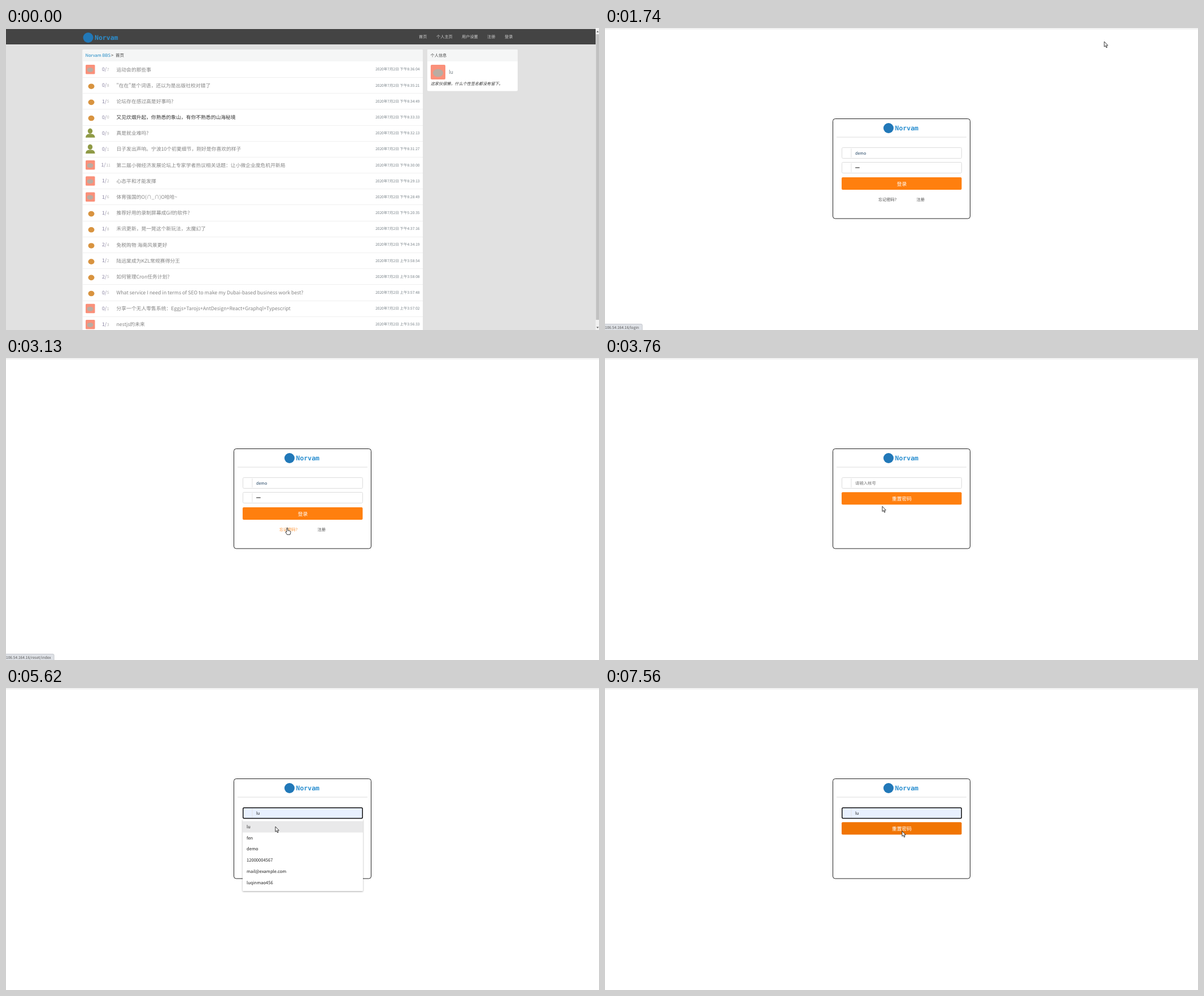
Recreate the animation shown at these times as an HTML page with a canvas. Size 1050 by 534 pixels, loop 8000 ms.

```html
<!DOCTYPE html>
<html lang="zh">
<head>
<meta charset="utf-8">
<title>Norvam BBS</title>
<style>
  html, body { margin: 0; width: 100%; height: 100%; overflow: hidden; background: #fff; }
  canvas { display: block; }
</style>
</head>
<body>
<canvas id="stage" width="1050" height="534"></canvas>
<script>
const ctx = document.getElementById('stage').getContext('2d');
ctx.textRendering = 'geometricPrecision';
const SANS = '"Noto Sans CJK SC", "Noto Sans CJK", "Noto Sans", sans-serif';
const MONO = '"DejaVu Sans Mono", monospace';
const LOOP = 8000;
const BLUE = '#2b8fd0';

// avatar | replies | views | title | time
const topics = `e|0|7|运动会的那些事|下午8:36:04
t|0|8|"在在"是个词语，还以为是出版社校对错了|下午8:35:21
t|1|5|论坛存在感过高是好事吗?|下午8:34:49
t|0|0|又见炊烟升起，你熟悉的象山，有你不熟悉的山海秘境|下午8:33:33
p|0|9|真是就业难吗?|下午8:32:13
p|0|1|日子发出声响。宁波10个初夏细节，刚好是你喜欢的样子|下午8:31:27
e|1|11|第二届小微经济发展论坛上专家学者热议相关话题：让小微企业度危机开新局|下午8:30:00
e|1|2|心态平和才能发揮|下午8:29:13
e|1|6|体育强国的O(∩_∩)O哈哈~|下午8:28:49
t|1|4|推荐好用的录制屏幕成Gif的软件?|下午5:20:35
t|1|8|禾讯更新，晃一晃这个新玩法，太魔幻了|下午4:37:16
t|2|4|免税购物 海南风景更好|下午4:34:19
t|1|2|陆远棠成为KZL常规赛得分王|上午3:58:54
t|2|5|如何管理Cron任务计划?|上午3:58:08
t|0|5|What service I need in terms of SEO to make my Dubai-based business work best?|上午3:57:48
e|0|1|分享一个无人零售系统：Eggjs+Tarojs+AntDesign+React+Graphql+Typescript|上午3:57:02
e|1|3|nestjs的未来|上午3:56:33`.split('\n').map(line => line.split('|'));
const UNREAD = 3;

const accounts = ['lu', 'fen', 'demo', '12000004567', 'mail@example.com', 'luqinmao456'];

// Cursor moves: first step, last step, number of steps, end point
const moves = [
  [190, 730, 8, 884, 7],
  [880, 1030, 3, 885, 14],
  [1740, 1740, 1, 884, 24],
  [1817, 2510, 10, 620, 222],
  [2580, 3130, 8, 498, 300],
  [3210, 3210, 1, 499, 301],
  [3690, 3920, 4, 483, 223.5],
  [5230, 5300, 2, 480, 221],
  [5470, 5620, 3, 477, 245],
  [6170, 6320, 3, 502.5, 257],
  [6400, 6400, 1, 511, 258],
  [6550, 6720, 3, 522, 254],
  [7100, 7330, 4, 526, 253]
];
const clicks = [[1510, 1580], [3530, 3607], [3920, 3995], [5940, 6020]];

const between = (v, a, b) => v >= a && v < b;
const inside = (p, x0, y0, x1, y1) => between(p.x, x0, x1) && between(p.y, y0, y1);

function cursorAt(t) {
  let x = 1014, y = 542;
  for (const [start, end, steps, toX, toY] of moves) {
    if (t < start) break;
    const ratio = end > start ? Math.min(1, (t - start) / (end - start)) : 1;
    const u = (Math.floor(ratio * (steps - 1) + 0.1) + 1) / steps;
    x += (toX - x) * u;
    y += (toY - y) * u;
  }
  return { x, y };
}

function rect(x, y, w, h, fill) {
  ctx.fillStyle = fill;
  ctx.fillRect(x, y, w, h);
}

function box(x, y, w, h, r, fill, stroke, width = 1) {
  ctx.beginPath();
  ctx.roundRect(x, y, w, h, r);
  if (fill) { ctx.fillStyle = fill; ctx.fill(); }
  if (stroke) { ctx.strokeStyle = stroke; ctx.lineWidth = width; ctx.stroke(); }
}

function oval(x, y, rx, ry, fill) {
  ctx.fillStyle = fill;
  ctx.beginPath();
  ctx.ellipse(x, y, rx, ry, 0, 0, 7);
  ctx.fill();
}

// Text centred vertically on cy; returns its width
function text(str, x, cy, size, color, align = 'left', style = '', family = SANS) {
  ctx.font = `${style} ${size}px ${family}`;
  ctx.fillStyle = color;
  ctx.textAlign = align;
  ctx.fillText(str, x, cy + size * 0.37);
  return ctx.measureText(str).width;
}

function shape(path, x, y) {
  const p = new Path2D(path);
  ctx.save();
  ctx.translate(x, y);
  ctx.fillStyle = '#fff';
  ctx.strokeStyle = '#222';
  ctx.lineWidth = 0.9;
  ctx.lineJoin = 'round';
  ctx.fill(p);
  ctx.stroke(p);
  ctx.restore();
}

function drawLogo(x, y) {
  oval(x, y, 9, 9, '#2178b8');
  text('Norvam', x + 11.5, y, 11.5, BLUE, 'left', 'bold', MONO);
}

function drawAvatar(kind, cy) {
  if (kind === 'e') {
    box(141, cy - 8, 16.5, 16.5, 1.5, '#fa907a');
    oval(149, cy + 1, 5.5, 4, '#b9aca2');
  } else if (kind === 't') {
    oval(151, cy + 2, 5.5, 4.8, '#d8933f');
  } else {
    oval(149, cy - 3.5, 4.2, 4.7, '#8f9a45');
    box(141, cy + 1.5, 16.5, 6.5, [6, 6, 0, 0], '#8f9a45');
  }
}

function drawTopic([avatar, replies, views, title, time], i) {
  const cy = 73 + 28.18 * i;
  drawAvatar(avatar, cy);
  const x = 170 - (views.length - 1) * 1.5;
  const w = text(replies + '/', x, cy, 8.6, '#857f9e');
  text(views, x + w + 0.6, cy + 0.3, 7, '#b4b4b4');
  text(title, 195.5, cy + 0.3, 8.8, i === UNREAD ? '#333' : '#858585');
  text('2020年7月2日 ' + time, 732.5, cy, 6.6, '#778087', 'right');
  rect(136, Math.round(cy + 14), 602, 1, '#f0f0f0');
}

function drawForum(pointer) {
  rect(0, 0, 1050, 534, '#e1e1e1');
  rect(0, 0, 1050, 2, '#f5f5f5');
  rect(0, 1.5, 1044, 27.5, '#444');
  drawLogo(145.5, 17);
  const hover = inside(pointer, 881, 9, 899, 22);
  [['首页', 731], ['个人主页', 762], ['用户设置', 807], ['注册', 852], ['登录', 883]].forEach(([label, x]) =>
    text(label, x, 15.5, 7.2, hover && x === 883 ? '#fff' : '#d0d0d0'));

  box(135.5, 38, 602.5, 500, 2, '#fff');
  box(135.5, 38, 602.5, 21, [2, 2, 0, 0], '#f5f6f6');
  text('Norvam BBS', 140.5, 48.5, 7.6, '#1a87c4');
  text('>', 186, 48.5, 7.6, '#444');
  text('首页', 194, 48.5, 7.6, '#444');
  topics.forEach(drawTopic);

  box(746, 38, 160, 73.5, 2, '#fff');
  box(746, 38, 160, 21, [2, 2, 0, 0], '#f5f6f6');
  text('个人信息', 751.5, 48.5, 7.2, '#444');
  box(752, 65, 26, 26, 2, '#fa907a');
  oval(765, 79.5, 9, 7, '#b9aca2');
  text('lu', 784, 78, 9, '#778087');
  text('这家伙很懒，什么个性签名都没有留下。', 752, 98.5, 7.1, '#333', 'left', 'italic');

  rect(1044, 1, 6, 533, '#f1f1f1');
  rect(1044.5, 11, 5.5, 505, '#c1c1c1');
  ctx.fillStyle = '#555';
  ctx.fill(new Path2D('M1045.5 7.5h4l-2-2.5zM1045.5 528.5h4l-2 2.5z'));
  return hover ? 'hand' : 'arrow';
}

function drawCard() {
  rect(0, 0, 1050, 534, '#fff');
  rect(0, 1, 1050, 1, '#dfdfdf');
  box(403.5, 160.5, 243, 176.5, 4, '#fff', '#222');
  drawLogo(502, 177);
  rect(410, 192.5, 230, 1, '#ddd');
}

function drawField(y, fill = '#fff', focused = false) {
  if (focused) box(419.75, y + 0.75, 211.5, 18.75, 2, fill, '#101010', 1.5);
  else box(419.5, y + 0.5, 212, 19, 2, fill, '#dcdcdc');
  rect(435.5, y + 2, 1, 16, '#e2e2e2');
}

function drawButton(label, y, pointer) {
  const hover = inside(pointer, 419, y, 632, y + 22);
  box(419, y, 212.5, 22, 2, hover ? '#f17503' : '#ff7f0e');
  text(label, 525.5, y + 11.7, 8.8, '#fff', 'center');
}

function drawLogin(pointer) {
  drawCard();
  drawField(211);
  text('demo', 443, 221, 7.1, '#1e4060', 'left', '500');
  drawField(237);
  [444.5, 447, 449.5].forEach(x => oval(x, 247, 0.9, 0.9, '#222'));
  drawButton('登录', 264, pointer);
  const forgot = inside(pointer, 483, 297, 518, 310);
  text('忘记密码?', 484, 303, 7.2, forgot ? '#ff8c26' : '#444');
  text('注册', 551.5, 303, 7.2, '#444');
  const overField = inside(pointer, 419, 211, 632, 231) || inside(pointer, 419, 237, 632, 257);
  return forgot ? 'hand' : overField ? 'beam' : 'arrow';
}

function drawAccounts(picked) {
  ctx.save();
  ctx.shadowColor = 'rgba(0,0,0,.35)';
  ctx.shadowBlur = 3;
  ctx.shadowOffsetY = 1;
  box(419, 232, 213, 127, 1, '#fff');
  ctx.restore();
  if (picked) rect(419, 235.5, 213, 20, '#e9e9ea');
  accounts.forEach((name, i) => text(name, 426, 245 + 19.8 * i, 7.6, '#222'));
}

function drawReset(t, pointer) {
  const focused = t >= 3995;
  const listOpen = between(t, 4070, 6020);
  const filled = t >= 5545;
  const caret = between(t, 3995, 4520) || between(t, 5000, 5470) ||
    between(t, 6020, 6550) || between(t, 7100, 7560);

  drawCard();
  drawField(211, filled ? '#e8f0fe' : '#fff', focused);
  if (filled) text('lu', 443, 221, 7.3, '#222');
  else text('请输入帐号', 443, 221, 7.4, '#757575');
  if (caret) rect(t < 6000 ? 443 : 450.5, 217, 0.9, 8, '#111');
  if (listOpen) drawAccounts(filled);
  else drawButton('重置密码', 237.3, pointer);
  return inside(pointer, 419, 211, 632, 231) ? 'beam' : 'arrow';
}

function drawStatus(url, width) {
  box(-2, 523.5, width + 2, 14, [0, 2, 0, 0], '#dee1e6', '#c4c6cc');
  text(url, 0, 529.3, 6.6, '#555');
}

function drawCursor(kind, { x, y }) {
  if (kind === 'hand') {
    shape('M-1 1Q0-.8 1 1V5L4.8 5.8Q6.3 6.3 6 8.5L5 12.3H-.3L-3.2 8Q-2.8 6.4-1 7.8Z', x, y);
  } else if (kind === 'beam') {
    ctx.strokeStyle = '#333';
    ctx.lineWidth = 0.9;
    ctx.stroke(new Path2D(`M${x - 2} ${y - 5}h4m-2 0v10m-2 0h4`));
  } else {
    shape('M0 0V9.2L2.1 7.3L3.6 10.8L5.1 10.1L3.7 6.8H6.4Z', x, y);
  }
}

function draw(t) {
  const pointer = cursorAt(t);
  const kind = t < 1740 ? drawForum(pointer) : t < 3690 ? drawLogin(pointer) : drawReset(t, pointer);
  if (between(t, 957, 1817)) drawStatus('106.54.164.16/login', 66);
  if (between(t, 3130, 3690)) drawStatus('106.54.164.16/reset/index', 85);
  if (clicks.some(([from, to]) => between(t, from, to))) {
    oval(pointer.x, pointer.y, 7, 7, 'rgba(255,255,0,.47)');
  }
  if (t >= 190) drawCursor(kind, pointer);
}

const begin = performance.now();
function tick() {
  draw((performance.now() - begin) % LOOP);
  requestAnimationFrame(tick);
}
tick();
</script>
</body>
</html>
```
